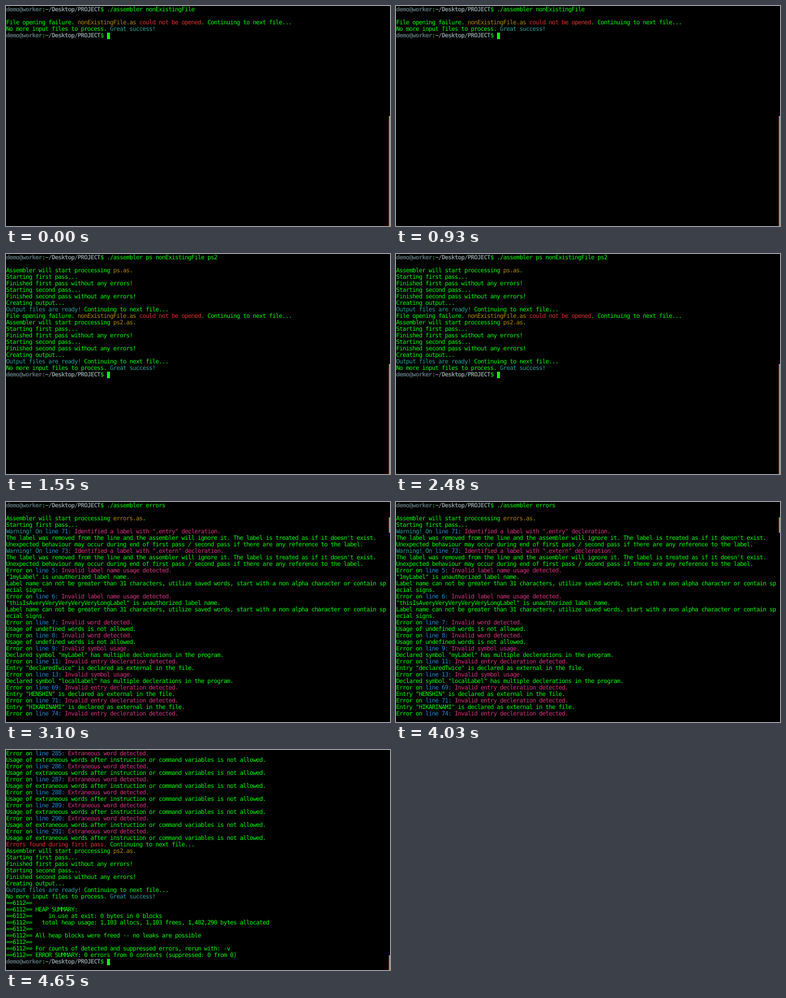
Write an HTML page that moves like this. It is 650 px wide and 372 px high and loops after 6.2 s.

```html
<!DOCTYPE html>
<html lang="en">
<head>
<meta charset="utf-8">
<title>Assembler runs</title>
<style>
  html, body { margin: 0; width: 100%; height: 100%; overflow: hidden; background: #000; }
  .screen { position: absolute; left: 0; top: 0; width: 650px; height: 372px; overflow: hidden; background: #000; visibility: hidden; }
  pre {
    position: absolute; left: 0.3px; top: 1px; margin: 0;
    font: 10.2px/11px "DejaVu Sans Mono", monospace;
    letter-spacing: calc(5.5px - 0.602em);
    font-variant-ligatures: none;
    text-rendering: geometricPrecision;
    color: #00ff00;
  }
  .line { height: 11px; white-space: pre; }
  .u { color: #586e75; font-weight: bold; }
  .p { color: #839496; font-weight: bold; }
  .y { color: #b58900; }
  .r { color: #dc322f; }
  .c { color: #2aa198; }
  .b { color: #268bd2; }
  .m { color: #d33682; }
  .cursor { display: inline-block; width: 5.5px; height: 11px; background: #00ff00; vertical-align: top; }
  .bar { position: absolute; left: 648px; width: 2px; background: #e4734a; }
</style>
</head>
<body>
<script>
const HOLD = 1550;

// Coloured runs are written as {class|text}
const prompt = cmd => `{u|demo@worker}:{p|~/Desktop/PROJECT}$ ${cmd}`;
const idle = prompt('{cursor|}');
const error = (line, text) => `Error on {b|line ${line}:} {m|${text}}`;
const next = 'Continuing to next file...';
const begin = file => [`Assembler will start proccessing {y|${file}.as}.`, 'Starting first pass...'];
const assemble = file => [
  ...begin(file),
  'Finished first pass without any errors!',
  'Starting second pass...',
  'Finished second pass without any errors!',
  'Creating output...',
  `{c|Output files are ready!} ${next}`
];
const missing = `File opening failure. {y|nonExistingFile.as} {r|could not be opened}. ${next}`;
const done = 'No more input files to process. {c|Great success!}';

const warning = (line, kind) => [
  `{c|Warning! On} {b|line ${line}:} {m|Identified a label with ".${kind}" decleration.}`,
  "The label was removed from the line and the assembler will ignore it. The label is treated as if it doesn't exist.",
  'Unexpected behaviour may occur during end of first pass / second pass if there are any reference to the label.'
];
const badLabel = (line, label) => [
  error(line, 'Invalid label name usage detected.'),
  `"${label}" is unauthorized label name.`,
  'Label name can not be greater than 31 characters, utilize saved words, start with a non alpha character or contain sp',
  'ecial signs.'
];
const badWord = line => [error(line, 'Invalid word detected.'), 'Usage of undefined words is not allowed.'];
const badSymbol = (line, name) => [
  error(line, 'Invalid symbol usage.'),
  `Declared symbol "${name}" has multiple declerations in the program.`
];
const entryError = line => error(line, 'Invalid entry decleration detected.');
const badEntry = (line, name) => [entryError(line), `Entry "${name}" is declared as external in the file.`];
const extraWord = line => [
  error(line, 'Extraneous word detected.'),
  'Usage of extraneous words after instruction or command variables is not allowed.'
];

const heap = [
  '',
  ' HEAP SUMMARY:',
  '     in use at exit: 0 bytes in 0 blocks',
  '   total heap usage: 1,103 allocs, 1,103 frees, 1,482,290 bytes allocated',
  '',
  ' All heap blocks were freed -- no leaks are possible',
  '',
  ' For counts of detected and suppressed errors, rerun with: -v',
  ' ERROR SUMMARY: 0 errors from 0 contexts (suppressed: 0 from 0)'
].map(text => '==6112==' + text);

// bar: top and height of the scrollbar thumb
const screens = [
  { bar: [186, 186], lines: [prompt('./assembler nonExistingFile'), '', missing, done, idle] },
  { bar: [186, 186], lines: [
    prompt('./assembler ps nonExistingFile ps2'), '',
    ...assemble('ps'), missing, ...assemble('ps2'), done, idle
  ] },
  { bar: [26, 26], lines: [
    prompt('./assembler errors'), '',
    ...begin('errors'),
    ...warning(71, 'entry'), ...warning(73, 'extern'),
    ...badLabel(5, '1myLabel'), ...badLabel(6, 'thisIsAveryVeryVeryVeryVeryLongLabel'),
    ...badWord(7), ...badWord(8),
    ...badSymbol(9, 'myLabel'), ...badEntry(11, 'declaredTwice'),
    ...badSymbol(13, 'localLabel'), ...badEntry(69, 'HENSHIN'),
    ...badEntry(71, 'HIKARINAMI'), entryError(74)
  ] },
  { bar: [347, 25], lines: [
    ...[285, 286, 287, 288, 289, 290, 291].flatMap(extraWord),
    `{r|Errors found during first pass.} ${next}`,
    ...assemble('ps2'), done, ...heap, idle
  ] }
];

const paint = text => text.replace(/\{(\w+)\|([^}]*)\}/g, '<span class="$1">$2</span>');

screens.forEach(({ bar: [top, height], lines }, i) => {
  const el = document.createElement('div');
  el.className = 'screen';
  const rows = lines.map(line => `<div class="line">${paint(line)}</div>`).join('');
  el.innerHTML = `<pre>${rows}</pre><div class="bar" style="top:${top}px;height:${height}px"></div>`;
  document.body.append(el);

  const count = screens.length;
  const show = el.animate([
    { visibility: 'visible', offset: 0, easing: 'step-end' },
    { visibility: 'hidden', offset: 1 / count, easing: 'step-end' },
    { visibility: 'hidden', offset: 1 }
  ], { duration: HOLD * count, delay: HOLD * (i - count), iterations: Infinity });
  show.startTime = 0;
});
</script>
</body>
</html>
```
